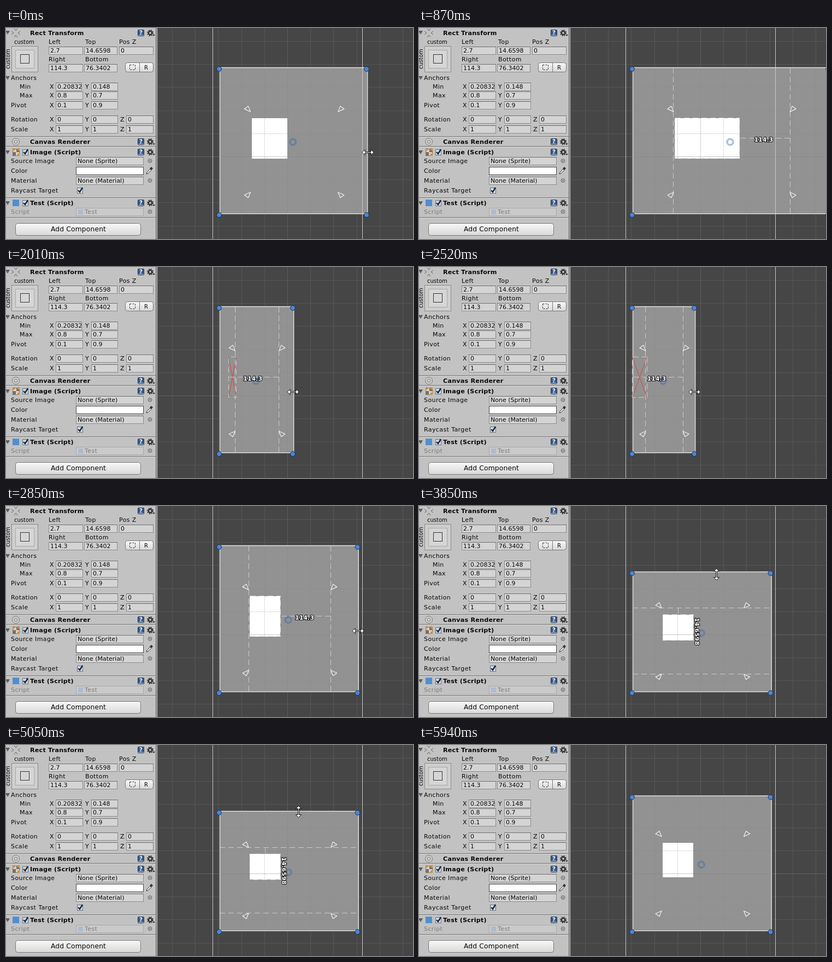
An HTML page that plays this animation: 745 px wide and 386 px high, repeating every 6300 ms.

```html
<!DOCTYPE html>
<html lang="en">
<head>
<meta charset="utf-8">
<title>Anchored rectangle</title>
<style>
html, body { margin: 0; width: 100%; height: 100%; overflow: hidden; background: #464646; }
svg { display: block; width: 745px; height: 386px; font: 11px "DejaVu Sans", sans-serif; }
text { fill: #080808; letter-spacing: .4px; white-space: pre; }
.val { letter-spacing: 0; }
.head { font-weight: bold; font-size: 11.2px; letter-spacing: .2px; }
.small { font-size: 10px; letter-spacing: 0; }
.button { font-size: 12.3px; letter-spacing: .15px; }
.mark { font-weight: bold; font-size: 10px; letter-spacing: 0; fill: #fff; text-anchor: middle; }
.off { fill: #7c7c7c; }
.crisp { shape-rendering: crispEdges; }
.dash { fill: none; stroke: #dcdcdc; stroke-opacity: .75; stroke-dasharray: 10 6; }
.size { font-weight: bold; letter-spacing: 0; fill: #fff; stroke: #000; stroke-opacity: .85; stroke-width: 2.2px; paint-order: stroke; text-anchor: middle; }
.tri { fill: none; stroke: #f0f0f0; stroke-width: 1.2; stroke-linejoin: round; }
.cursor { fill: #fff; stroke: #000; stroke-width: .9; }
</style>
</head>
<body>
<svg viewBox="0 0 745 386">
  <defs>
    <linearGradient id="btn" x2="0" y2="1">
      <stop stop-color="#f8f8f8"/><stop offset="1" stop-color="#d8d8d8"/>
    </linearGradient>
    <clipPath id="view"><path d="M278 0H745V386H278z"/></clipPath>
    <clipPath id="minClip"><path d="M91 98H139V116H91z"/></clipPath>
  </defs>
  <g clip-path="url(#view)">
    <path fill="#464646" d="M278 0H745V386H278z"/>
    <g class="crisp">
      <path id="panel" fill="#929292"/>
      <path id="image" fill="#fff"/>
      <path id="grid" fill="none" stroke="#808080" stroke-opacity=".27"/>
      <path d="M278 235.5H745" stroke="#808080" stroke-opacity=".45"/>
      <path d="M515.5 0V386" stroke="#808080" stroke-opacity=".15"/>
      <path d="M378.5 0V386M652.5 0V386" stroke="#c8c8c8"/>
    </g>
    <path id="border" fill="none" stroke="#e0e0e0" stroke-width="1.4"/>
    <path id="cross" fill="none" stroke="#d8453e"/>
    <g class="crisp">
      <path id="guides" class="dash"/>
      <path id="frame" class="dash"/>
    </g>
    <path id="tris" class="tri"/>
    <g id="pivot" fill="none" stroke="#3468ae">
      <circle r="5" stroke-width="3" stroke-opacity=".38"/>
      <circle r="6.6" stroke-opacity=".45"/>
    </g>
    <g id="knobs" fill="#4a87d8" stroke="#1a2c4a">
      <circle r="4.4"/><circle r="4.4"/><circle r="4.4"/><circle r="4.4"/>
    </g>
    <text id="size" class="size"></text>
    <path id="cursor" class="cursor"/>
  </g>
  <g id="inspector"></g>
</svg>
<script>
const $ = id => document.getElementById(id);

// ---------- inspector ----------
const text = (x, mid, str, cls = '') => `<text x="${x}" y="${mid + 4}" class="${cls}">${str}</text>`;
const box = (x, y, w, h, fill, stroke, more = '') =>
  `<rect x="${x + .5}" y="${y + .5}" width="${w - 1}" height="${h - 1}" fill="${fill}" stroke="${stroke}" ${more}/>`;
const path = (d, fill, stroke = 'none', more = '') => `<path d="${d}" fill="${fill}" stroke="${stroke}" ${more}/>`;
const ring = (x, y, r, stroke, fill = 'none', more = '') =>
  `<circle cx="${x}" cy="${y}" r="${r}" fill="${fill}" stroke="${stroke}" ${more}/>`;
const field = (x, mid, w, str) => box(x, mid - 7, w, 15, '#d4d4d4', '#8c8c8c') +
  path(`M${x} ${mid - 6.5}h${w}`, 'none', '#6f6f6f') + text(x + 3, mid, str, 'val');
const foldout = mid => path(`M-1 ${mid - 3}h8l-4 7z`, '#5c5c5c');
const check = (x, mid) => box(x - 5, mid - 5, 11, 11, '#d3dbe6', '#66707e') +
  path(`M${x - 3} ${mid}l3 3 5 -8`, 'none', '#14233c', 'stroke-width="2.4"');
const gear = mid => ring(264, mid, 3.2, '#333', 'none', 'stroke-width="2.4"') +
  ring(264, mid, 5, '#333', 'none', 'stroke-width="2" stroke-dasharray="2 1.93"') +
  path(`M268 ${mid + 3}h5l-2.5 3z`, '#333');
const help = mid => box(241, mid - 6, 12, 12, '#3a5d8e', '#1e2f4b', 'rx="1"') +
  path(`M242 ${mid + 4.5}h10`, 'none', '#c9d3e0') + text(247, mid - 1, '?', 'mark');
const header = (mid, str) => text(44, mid, str, 'head') + help(mid) + gear(mid);
const divider = y => path(`M0 ${y}.5H274`, 'none', '#707070') + path(`M0 ${y + 1}.5H274`, 'none', '#d8d8d8');
const picker = mid => ring(263.5, mid, 3.3, '#555') + ring(263.5, mid, .7, '#444');

function axes(mid, label, indent, values) {
  const cols = [[80, 91, 50], [145, 156, 49], [209, 220, 50]];
  return text(indent, mid, label) + values.map((v, i) => {
    const [lx, fx, w] = cols[i], f = field(fx, mid, w, v);
    return text(lx, mid, 'XYZ'[i]) + (v.length > 6 ? `<g clip-path="url(#minClip)">${f}</g>` + path('M138.5 100V114', 'none', '#8c8c8c') : f);
  }).join('');
}

$('inspector').innerHTML = [
  path('M0 0H274V386H0z', '#c2c2c2'),
  path('M274 0H278V386H274z', '#a3a3a3'), path('M274.5 0V386M277.5 0V386', 'none', '#666'),
  // layout block
  foldout(8), header(9, 'Rect Transform'),
  path('M15 1l3 4 3-4M15 17l3-4 3 4M10 6l4 3-4 3M26 6l-4 3 4 3', 'none', '#666'),
  text(15, 25, 'custom', 'small'),
  `<text class="small" transform="translate(7 75) rotate(-90)">custom</text>`,
  box(10, 33, 49, 48, '#cecece', '#8a8a8a'), box(17, 40, 35, 34, '#d6d6d6', '#a6a6a6'), box(26, 48, 17, 17, '#d6d6d6', '#333'),
  text(78, 25, 'Left'), text(145, 25, 'Top'), text(207, 25, 'Pos Z'),
  field(78, 41, 63, '2.7'), field(143, 41, 61, '14.6598'), field(207, 41, 63, '0'),
  text(78, 57, 'Right'), text(145, 57, 'Bottom'),
  field(78, 73, 63, '114.3'), field(143, 73, 61, '76.3402'),
  box(218, 63, 52, 18, 'url(#btn)', '#777', 'rx="4"'), path('M244.5 64V80', 'none', '#777'),
  box(226, 67, 11, 10, 'none', '#333', 'stroke-dasharray="3 2"'), text(253, 72, 'R', 'small'),
  foldout(91), text(9, 91, 'Anchors'),
  axes(107, 'Min', 25, ['0.20832', '0.148']),
  axes(123, 'Max', 25, ['0.8', '0.7']),
  axes(141, 'Pivot', 9, ['0.1', '0.9']),
  axes(167, 'Rotation', 9, ['0', '0', '0']),
  axes(185, 'Scale', 9, ['1', '1', '1']),
  // renderer
  divider(198), header(208, 'Canvas Renderer'),
  ring(18, 208, 6.5, '#777', '#d0d0d0'), ring(18, 208, 3, '#777'),
  // image block
  divider(216), foldout(227), header(227, 'Image (Script)'), check(35, 227),
  box(12, 221, 13, 13, '#d8d0c0', '#777'), path('M13 227h5v6h-5zM19 222h5v5h-5z', '#77716a'),
  path('M12 220h4v4h-4zM21 220h4v4h-4zM21 230h4v4h-4z', '#d98b2b'),
  text(9, 243, 'Source Image'), field(128, 243, 124, 'None (Sprite)'), picker(243),
  text(9, 261, 'Color'), box(128, 254, 124, 15, '#fff', '#444'),
  path('M257 267l1-3 6-6 2 2-6 6z', '#eee', '#333'), path('M263 257l3-3 3 3-3 3z', '#333'),
  text(9, 279, 'Material'), field(128, 279, 124, 'None (Material)'), picker(279),
  text(9, 297, 'Raycast Target'), check(135, 297),
  // script block
  divider(310), foldout(320), header(320, 'Test (Script)'), check(35, 320),
  path('M12 314h12v12h-12z', '#4f8fd0'),
  text(9, 336, 'Script', 'off'), box(128, 329, 124, 15, '#cacaca', '#a8a8a8'),
  path('M132 332h9v9h-9z', '#a9bdd2'), text(144, 336, 'Test', 'off'), picker(336),
  divider(346),
  box(17, 357, 230, 23, 'url(#btn)', '#777', 'rx="4"'), text(82, 368, 'Add Component', 'button')
].join('');

// ---------- scene ----------
const LEFT = 391, BOTTOM = 340, ZOOM = .8077, PITCH = 42.2, LOOP = 6300;
let gridPath = '';
for (let i = -5; i <= 5; i++) {
  gridPath += `M${Math.floor(515.5 + i * PITCH) + .5} 0V386`;
  if (i && i < 4) gridPath += `M278 ${Math.floor(235.5 + i * PITCH) + .5}H745`;
}
$('grid').setAttribute('d', gridPath);

const CURSORS = {
  h: 'M-10.5 0l5-5v4h11v-4l5 5-5 5v-4h-11v4z',
  v: 'M0-10.5l5 5h-4v11h4l-5 5-5-5h4v-11h-4z',
  a: 'M0 0V16l3.7-3.6 2.4 5.6 2.5-1-2.4-5.5h5.2z',
  none: ''
};

// time, right edge, top edge, cursor x, cursor y, dragged axis, cursor
const KEYS = [
  [0, 662, 73, 662.5, 227.5, '', 'h'],
  [359, 662, 73, 662.5, 227.5, '', 'h'],
  [360, 664, 73, 664, 228, 'h', 'h'],
  [870, 751, 73, 757, 228, 'h', 'h'],
  [990, 757, 73, 764, 228, 'h', 'h'],
  [1169, 757, 73, 764, 228, 'h', 'h'],
  [1170, 751, 73, 757, 228.5, 'h', 'h'],
  [1760, 590, 73, 588.5, 228.5, 'h', 'h'],
  [2010, 527, 73, 525.5, 228.5, 'h', 'h'],
  [2270, 507, 73, 505.5, 228.5, 'h', 'h'],
  [2520, 506, 73, 504.5, 228.5, 'h', 'h'],
  [2850, 645.5, 73, 644.5, 228.5, 'h', 'h'],
  [2986, 650, 73, 649, 228.5, 'h', 'h'],
  [3062, 645.5, 73, 644, 228.5, 'h', 'h'],
  [3130, 645.5, 73, 636, 200, '', 'a'],
  [3290, 645.5, 73, 553, 81, '', 'a'],
  [3420, 645.5, 73, 555.5, 73, '', 'v'],
  [3779, 645.5, 73, 555.5, 73, '', 'v'],
  [3780, 645.5, 97, 550, 99, 'v', 'v'],
  [3850, 645.5, 121, 544.5, 125, 'v', 'v'],
  [4070, 645.5, 180, 539, 182, 'v', 'v'],
  [4360, 645.5, 221, 535.5, 221, 'v', 'v'],
  [4610, 645.5, 207, 535.5, 206.5, 'v', 'v'],
  [5180, 645.5, 93.5, 535.5, 94, 'v', 'v'],
  [5300, 645.5, 93.5, 535.5, 94, '', 'v'],
  [5480, 645.5, 93.5, 500, 130, '', 'a'],
  [5633, 645.5, 93.5, 414, 230, '', 'a'],
  [5863, 645.5, 93.5, 700, 360, '', 'a'],
  [5940, 645.5, 93.5, 760, 400, '', 'none']
];

// The picture only changes on these beats: from, to, count
const STEPS = [
  [0, 0, 1], [360, 870, 8], [920, 990, 2], [1170, 1760, 9], [1890, 2010, 3], [2080, 2270, 3],
  [2520, 2520, 1], [2660, 2850, 4], [2910, 3290, 6], [3420, 3420, 1], [3780, 3850, 2],
  [3920, 4360, 7], [4610, 5180, 9], [5300, 5300, 1], [5480, 5940, 7]
].flatMap(([a, b, n]) => Array.from({ length: n }, (_, i) => Math.round(a + (b - a) * i / Math.max(1, n - 1))));

function pose(t) {
  const i = KEYS.findLastIndex(k => k[0] <= t), a = KEYS[i], b = KEYS[i + 1] || a;
  const f = b === a ? 0 : (t - a[0]) / (b[0] - a[0]);
  return [...[1, 2, 3, 4].map(n => a[n] + (b[n] - a[n]) * f), a[5], a[6]];
}

const px = v => Math.floor(v) + .5;
const rect = (x0, y0, x1, y1) => `M${x0} ${y0}H${x1}V${y1}H${x0}z`;
const setD = (id, d) => $(id).setAttribute('d', d);
const move = (node, x, y, more = '') => node.setAttribute('transform', `translate(${x} ${y})${more}`);

function draw(t) {
  const [right, top, cx, cy, drag, kind] = pose(t);
  const w = right - LEFT, h = BOTTOM - top;
  const ax0 = LEFT + .20832 * w, ax1 = LEFT + .8 * w;
  const ay0 = top + .3 * h, ay1 = BOTTOM - .148 * h;
  const x0 = ax0 + 2.7 * ZOOM, x1 = ax1 - 114.3 * ZOOM;
  const y0 = ay0 + 14.6598 * ZOOM, y1 = ay1 - 76.3402 * ZOOM;
  const flipped = x1 <= x0 || y1 <= y0;
  const midX = (x0 + x1) / 2, midY = (y0 + y1) / 2;

  setD('panel', rect(LEFT, top - .5, right, BOTTOM));
  setD('border', rect(LEFT + .5, top - .5, right - .3, BOTTOM - .3));
  setD('image', flipped ? '' : rect(x0, y0, x1, y1));
  setD('cross', flipped ? `M${x0} ${y0}L${x1} ${y1}M${x1} ${y0}L${x0} ${y1}` : '');
  setD('frame', drag ? rect(px(x0), px(y0), px(x1), px(y1)) : '');

  let guides = '';
  if (drag === 'h') guides = `M${px(ax0)} ${top}V${BOTTOM}M${px(ax1)} ${top}V${BOTTOM}M${x1 + 2} ${px(midY)}H${ax1}`;
  if (drag === 'v') guides = `M${LEFT} ${px(ay0)}H${right}M${LEFT} ${px(ay1)}H${right}M${px(midX)} ${ay0}V${y0}`;
  setD('guides', guides);

  const label = $('size');
  label.textContent = { h: '114.3', v: '14.6598' }[drag] || '';
  if (drag === 'h') move(label, (x1 + ax1) / 2 - 2, 208);
  if (drag === 'v') move(label, midX + 31, (ay0 + y0) / 2 + 37, ' rotate(90)');

  const tri = (x, y, sx, sy) => `M${x} ${y}l${4 * sx} ${10 * sy} ${7 * sx} ${-5 * sy}z`;
  setD('tris', tri(ax0, ay0, -1, -1) + tri(ax1, ay0, 1, -1) + tri(ax0, ay1, -1, 1) + tri(ax1, ay1, 1, 1));

  const kx = [390, right - 2], ky = [top + 2, 342];
  [...$('knobs').children].forEach((k, i) => move(k, kx[i & 1], ky[i >> 1]));
  move($('pivot'), (kx[0] + kx[1]) / 2, (ky[0] + ky[1]) / 2);

  setD('cursor', CURSORS[kind]);
  move($('cursor'), cx, cy);
}

const start = performance.now();
let shown = -1;
function tick() {
  const t = (performance.now() - start) % LOOP;
  const step = STEPS.findLast(s => s <= t);
  if (step !== shown) draw(shown = step);
  requestAnimationFrame(tick);
}
tick();
</script>
</body>
</html>
```
